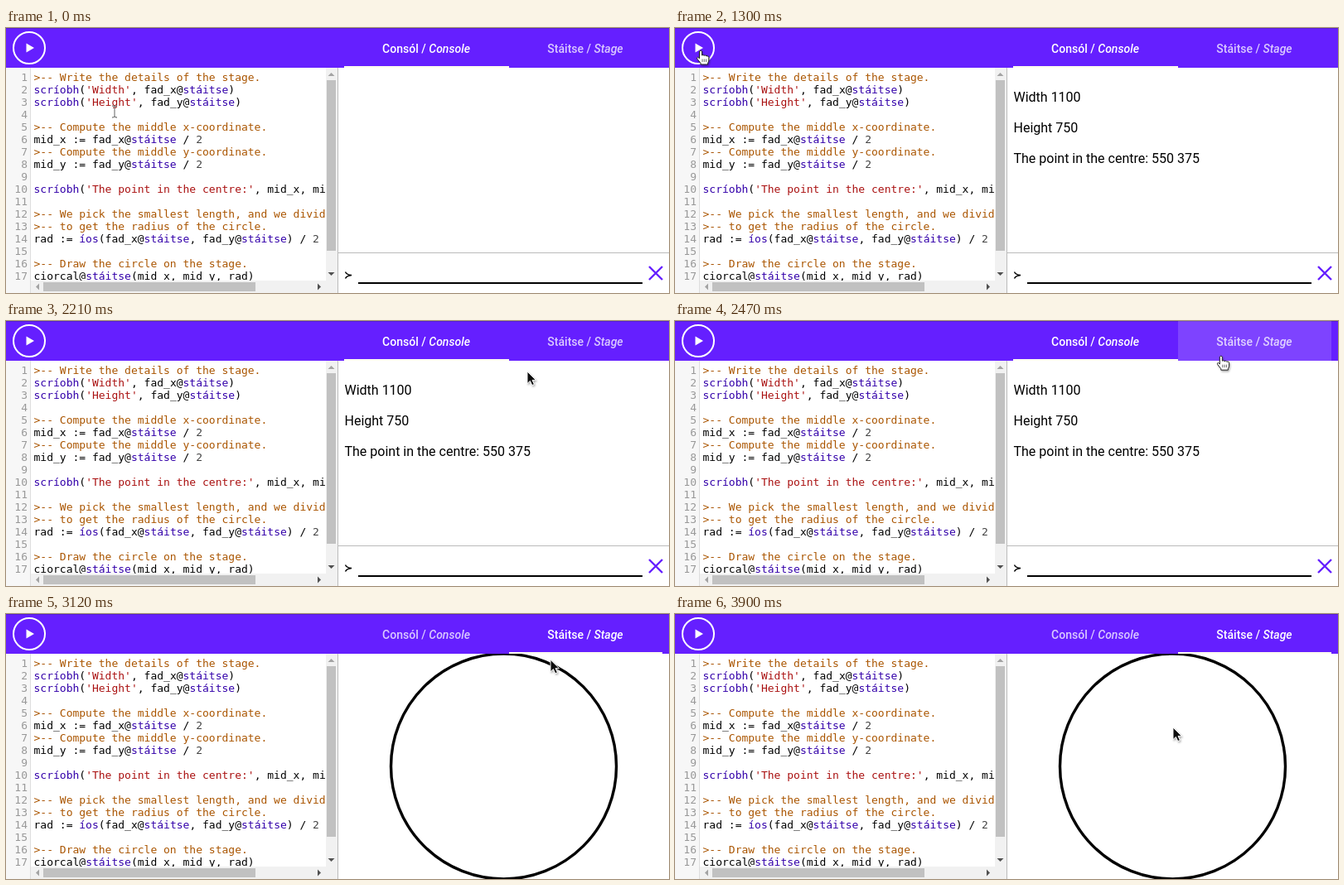
These frames come from a looping animation (800x320 px, 4030 ms). An HTML page:

```html
<!DOCTYPE html>
<html lang="en">
<head>
<meta charset="utf-8">
<title>Code editor demo</title>
<style>
html, body { margin: 0; width: 100%; height: 100%; overflow: hidden; background: #fff; }
svg { display: block; }
text { white-space: pre; }
.code { font: 13px "DejaVu Sans Mono", monospace; fill: #000; }
.num { fill: #999; text-anchor: end; }
.c { fill: #a50; }
.s { fill: #a11; }
.k { fill: #30a; }
.n { fill: #444; }
.tab { font: 500 14px Roboto, sans-serif; fill: #fff; text-anchor: middle; }
.tab tspan { font-style: italic; }
.out { font: 16px Roboto, sans-serif; fill: #000; }
</style>
</head>
<body>
<svg width="800" height="320" viewBox="0 0 800 320">
  <defs>
    <clipPath id="codeClip"><path d="M0 48H386V305H0z"/></clipPath>
    <filter id="soft" x="-50%" y="-50%" width="200%" height="200%">
      <feDropShadow dx="1" dy="1.5" stdDeviation="1" flood-opacity=".35"/>
    </filter>
  </defs>
  <rect width="800" height="320" fill="#fff"/>

  <rect y="48" width="29" height="272" fill="#f7f7f7"/>
  <rect x="29" y="48" width="1" height="272" fill="#ddd"/>
  <g id="code" class="code" clip-path="url(#codeClip)"></g>

  <path d="M386 48H400V320H30V305H386z" fill="#f1f1f1"/>
  <path d="M387 63H398V269H387zM45 307H301V318H45z" fill="#c1c1c1"/>
  <path d="M388.5 58L392.5 54L396.5 58zM40 308.5L36 312.5L40 316.5z" fill="#a3a3a3"/>
  <path d="M388.5 295L392.5 299L396.5 295zM376 308.5L380 312.5L376 316.5z" fill="#505050"/>
  <rect x="400" y="48" width="1" height="272" fill="#bbb"/>

  <g id="console">
    <g id="output" class="out">
      <text x="408.5" y="89">Width 1100</text>
      <text x="408.5" y="126">Height 750</text>
      <text x="408.5" y="163">The point in the centre: 550 375</text>
    </g>
    <rect x="401" y="271" width="399" height="1" fill="#bbb"/>
    <path d="M409.5 294.5Q411 298 417 298.5Q411 299 409.5 302.5" fill="none" stroke="#000" stroke-width="1.5"/>
    <rect x="425" y="307" width="343" height="2"/>
    <path d="M776 288L792 304M792 288L776 304" stroke="#651fff" stroke-width="2.4"/>
  </g>
  <circle id="stage" cx="600.5" cy="184" r="136" fill="none" stroke="#000" stroke-width="3.4"/>

  <rect width="800" height="48" fill="#651fff"/>
  <rect width="800" height="1" fill="#5620cc"/>
  <rect id="hover" x="607" width="185" height="48" fill="#fff" fill-opacity=".16"/>
  <circle cx="28" cy="24" r="19" fill="none" stroke="#fff" stroke-width="2"/>
  <path d="M24.5 18.5L34 24L24.5 29.5z" fill="#fff"/>
  <text id="tabA" class="tab" x="507" y="30">Consól / <tspan>Console</tspan></text>
  <text id="tabB" class="tab" x="699" y="30">Stáitse / <tspan>Stage</tspan></text>
  <rect id="bar" y="46" height="2" fill="#fffdf0"/>

  <g id="beam" fill="none" stroke="#888" stroke-width="1.3">
    <path d="M-3 -7Q0 -7 0 -5Q0 -7 3 -7M0 -5V5M-3 7Q0 7 0 5Q0 7 3 7"/>
  </g>
  <g id="arrow" filter="url(#soft)">
    <path d="M0 0V14.5L3.4 11.4L5.8 16.6L8.4 15.4L6 10.4H10.4z" fill="#111" stroke="#fff" stroke-width=".9"/>
  </g>
  <g id="hand" filter="url(#soft)">
    <path d="M-1.5 1Q0 -1 1.5 1V6Q3 4.8 4.2 6.3Q5.8 5.2 7 6.9Q9.5 6 9.8 8.5V12Q9.6 14 8.5 15.5V17H0V15.5L-4 10.5Q-5.2 8.5 -3.4 8.2L-1.5 9.8z" fill="#fff" stroke="#222" stroke-width="1"/>
    <path d="M2 10.5V14M4.3 10.5V14M6.6 10.5V14" stroke="#444" stroke-width=".8"/>
  </g>
</svg>
<script>
const LOOP = 4030, STEP = 130;
const $ = id => document.getElementById(id);

const lines = [
  ">-- Write the details of the stage.",
  "scríobh('Width', fad_x@stáitse)",
  "scríobh('Height', fad_y@stáitse)",
  "",
  ">-- Compute the middle x-coordinate.",
  "mid_x := fad_x@stáitse / 2",
  ">-- Compute the middle y-coordinate.",
  "mid_y := fad_y@stáitse / 2",
  "",
  "scríobh('The point in the centre:', mid_x, mid_y)",
  "",
  ">-- We pick the smallest length, and we divide by 2",
  ">-- to get the radius of the circle.",
  "rad := íos(fad_x@stáitse, fad_y@stáitse) / 2",
  "",
  ">-- Draw the circle on the stage.",
  "ciorcal@stáitse(mid_x, mid_y, rad)"
];
const rules = /(?<c>>--.*)|(?<s>'[^']*')|(?<k>scríobh|stáitse|íos)|(?<n>\b\d+)/g;

function paint(line) {
  return line.replace(rules, (m, ...rest) => {
    const groups = rest[rest.length - 1];
    const kind = Object.keys(groups).find(k => groups[k]);
    return `<tspan class="${kind}">${m.replace(">", "&gt;")}</tspan>`;
  });
}
$("code").innerHTML = lines.map((line, i) => {
  const y = 64 + 15 * i;
  return `<text class="num" x="26" y="${y}">${i + 1}</text><text x="33.5" y="${y}">${paint(line)}</text>`;
}).join("");

const ease = {
  in: p => p ** 1.3,
  out: p => 1 - (1 - p) ** 1.4,
  both: p => (1 - Math.cos(Math.PI * p)) / 2
};
// time, x, y, easing into this point
const path = [
  [0, 131, 101, "both"],
  [650, 31, 27, "both"],
  [1300, 31, 27, "both"],
  [2210, 629, 61, "both"],
  [2600, 667, 37, "out"],
  [2860, 667, 37, "both"],
  [3510, 634, 97, "in"],
  [3900, 601, 137, "out"]
];

function pointer(t) {
  const i = path.findIndex(k => k[0] >= t);
  if (i === 0) return path[0].slice(1, 3);
  const a = path[i - 1], b = path[i];
  const p = ease[b[3]]((t - a[0]) / (b[0] - a[0]));
  return [a[1] + (b[1] - a[1]) * p, a[2] + (b[2] - a[2]) * p];
}

function cursorKind(x, y) {
  const onPlay = Math.hypot(x - 28, y - 24) < 20;
  if (onPlay || (x > 607 && x < 792 && y < 48)) return "hand";
  return x > 30 && x < 386 && y > 48 && y < 305 ? "beam" : "arrow";
}

function show(id, on) { $(id).style.display = on ? "" : "none"; }

function draw(t) {
  const [x, y] = pointer(t);
  const kind = cursorKind(x, y);
  for (const id of ["beam", "arrow", "hand"]) {
    show(id, id === kind);
    $(id).setAttribute("transform", `translate(${x.toFixed(1)} ${y.toFixed(1)})`);
  }
  const staged = t >= 2730;
  show("output", t >= 1040);
  show("console", !staged);
  show("stage", staged);
  show("hover", kind === "hand" && x > 607);
  $("tabA").style.fillOpacity = staged ? .76 : 1;
  $("tabB").style.fillOpacity = staged ? 1 : .76;

  const [left, right] = t < 2730 ? [408, 607] : t < 2860 ? [408, 718] : t < 2990 ? [540, 792] : [607, 792];
  $("bar").setAttribute("x", left);
  $("bar").setAttribute("width", right - left);
}

const start = performance.now();
function tick() {
  const t = (performance.now() - start) % LOOP;
  draw(Math.min(Math.floor(t / STEP) * STEP, 3900));
  requestAnimationFrame(tick);
}
tick();
</script>
</body>
</html>
```
